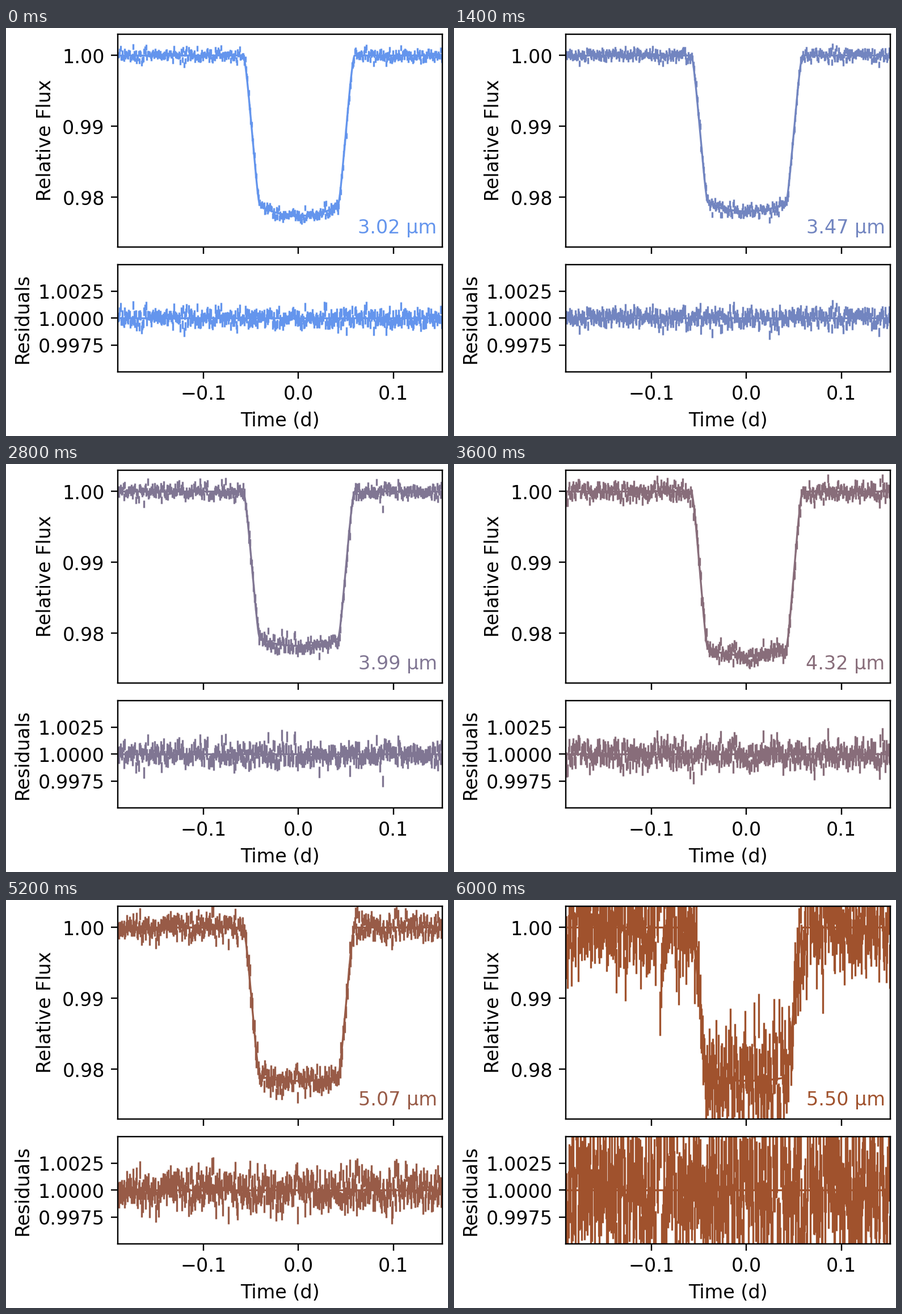
Write a matplotlib script that moves like this. It is 779x719 px and loops after 6200 ms.

```python
import numpy as np
import matplotlib.pyplot as plt
from matplotlib.animation import FuncAnimation

W, H, DPI = 779, 719, 240
FRAMES, STEP_MS = 31, 200
N = 465
T0, RATIO, IMPACT, SPEED = 0.0005, 0.146, 0.39, 18.4
LEFT, RIGHT = 197, 769

BLUE = np.array([100, 149, 237]) / 255
BROWN = np.array([160, 82, 45]) / 255

t = np.linspace(-0.1897, 0.1510, N)
fine = np.linspace(-0.1900, 0.1512, 1500)


def depth(k):
    """Transit depth: a falling slope plus one absorption band."""
    return 0.0216 + 0.001 * np.exp(-k / 7) + 0.0015 * np.exp(-((k - 18.5) / 2.2)**2)


def error(k):
    """Error bar: slow growth, then a steep rise at the detector's red edge."""
    return 0.0004 + 0.0004 * (k / 26)**2 + 0.0022 * np.exp(1.2 * (k - FRAMES + 1))


def covered(z):
    """Fraction of the planet's disc in front of the star."""
    p = RATIO
    zc = np.clip(z, 1 - p + 1e-9, 1 + p - 1e-9)
    a = np.arccos((zc**2 + p**2 - 1) / (2 * zc * p))
    b = np.arccos((zc**2 + 1 - p**2) / (2 * zc))
    lens = p**2 * (a - np.sin(2 * a) / 2) + b - np.sin(2 * b) / 2
    return np.where(z >= 1 + p, 0, np.where(z <= 1 - p, 1, lens / (np.pi * p**2)))


def transit(time, k):
    z = np.hypot(IMPACT, SPEED * (time - T0))
    u = 0.17 - 0.11 * k / (FRAMES - 1)
    limb = 1 - u * (1 - np.sqrt(1 - np.minimum(z, 0.93)**2))
    limb0 = 1 - u * (1 - np.sqrt(1 - IMPACT**2))
    return 1 - depth(k) * covered(z) * limb / limb0


def bars(y, err):
    return np.stack([np.column_stack([t, y - err]), np.column_stack([t, y + err])], axis=1)


plt.rcParams.update({"font.family": "DejaVu Sans", "axes.linewidth": 0.72,
                     "xtick.major.width": 0.72, "ytick.major.width": 0.72})
fig = plt.figure(figsize=((W + 0.01) / DPI, (H + 0.01) / DPI), dpi=DPI, facecolor="white")


def panel(top, bottom, ylim, yticks):
    ax = fig.add_axes([LEFT / W, 1 - bottom / H, (RIGHT - LEFT) / W, (bottom - top) / H])
    ax.set(xlim=(-0.1903, 0.1515), ylim=ylim, xticks=[-0.1, 0, 0.1], yticks=yticks)
    marks = ax.vlines(t, 1, 1, lw=1)
    line, = ax.plot(fine, np.ones_like(fine), lw=1)
    return ax, marks, line


def side_label(x, y, text):
    fig.text(x / W, 1 - y / H, text, rotation=90, rotation_mode="anchor",
             ha="center", va="baseline")


flux_ax, flux_bars, flux_line = panel(11, 386, (0.973, 1.003), [0.98, 0.99, 1.0])
res_ax, res_bars, res_line = panel(417, 606, (0.995, 1.005), [0.9975, 1.0, 1.0025])
flux_ax.tick_params(labelbottom=False)
res_ax.set_xlabel("Time (d)")
side_label(78.5, 198, "Relative Flux")
side_label(38.5, 511.5, "Residuals")
label = fig.text(759.5 / W, 1 - 362 / H, "", ha="right", va="baseline")


def draw(k):
    color = BLUE + (BROWN - BLUE) * k / (FRAMES - 1)
    err = error(k)
    noise = np.random.default_rng(390 + k).normal(0, 1.08 * err, N)
    flux_bars.set_segments(bars(transit(t, k) + noise, err))
    res_bars.set_segments(bars(1 + noise, err))
    flux_line.set_ydata(transit(fine, k))
    label.set_text(f"{3.017 * np.exp(0.02 * k):.2f} µm")
    artists = [flux_bars, res_bars, flux_line, res_line, label]
    for artist in artists:
        artist.set_color(color)
    return artists


anim = FuncAnimation(fig, draw, frames=FRAMES, interval=STEP_MS, repeat=True,
                     repeat_delay=0, blit=False)
plt.show()
```
